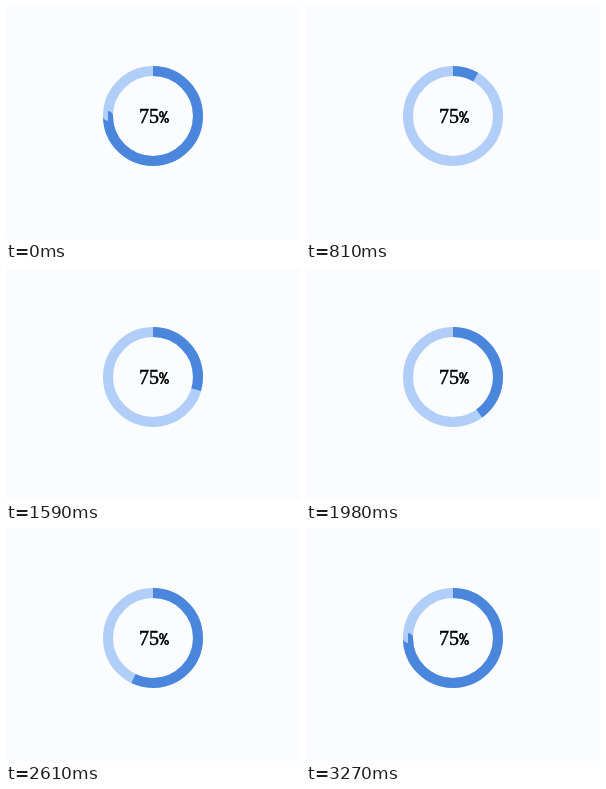
Write an HTML page that moves like this. It is 294 by 233 pixels and loops after 4110 ms.

```html
<!DOCTYPE html>
<html lang="en">
<head>
<meta charset="utf-8">
<title>Progress ring</title>
<style>
  html, body { margin: 0; width: 100%; height: 100%; overflow: hidden; background: #fafcff; }
  svg { display: block; width: 294px; height: 233px; }
  circle { fill: none; stroke-width: 10; }
  .track { stroke: #b1cef8; }
  .bar { stroke: #4a86dc; }
  text { font: 20px "Liberation Serif", serif; fill: #000; stroke: #000; stroke-width: .5; }
  .sign { font: 600 16.67px "Noto Sans Mono", monospace; stroke: none; }
</style>
</head>
<body>
<svg viewBox="0 0 294 233">
  <circle class="track" cx="147" cy="110" r="45"/>
  <circle class="bar" cx="147" cy="110" r="45" pathLength="360" transform="rotate(-90 147 110)"/>
  <text x="133" y="117">75<tspan class="sign">%</tspan></text>
</svg>
<script>
  const LOOP = 4110, START = 570, STEP = 30, STEPS = 90, FULL = 270;
  const LEAD = 6.9; // degrees already swept when the bar first shows
  const bar = document.querySelector('.bar');

  function sweep(ms) {
    if (ms < START) return FULL;
    const n = Math.min(STEPS, Math.floor((ms - START) / STEP));
    return n === 0 ? 0 : LEAD + (FULL - LEAD) * n / STEPS;
  }

  function draw(now) {
    const angle = sweep(now % LOOP);
    bar.style.visibility = angle ? 'visible' : 'hidden';
    bar.setAttribute('stroke-dasharray', `${angle} 360`);
    requestAnimationFrame(draw);
  }
  draw(performance.now());
</script>
</body>
</html>
```
